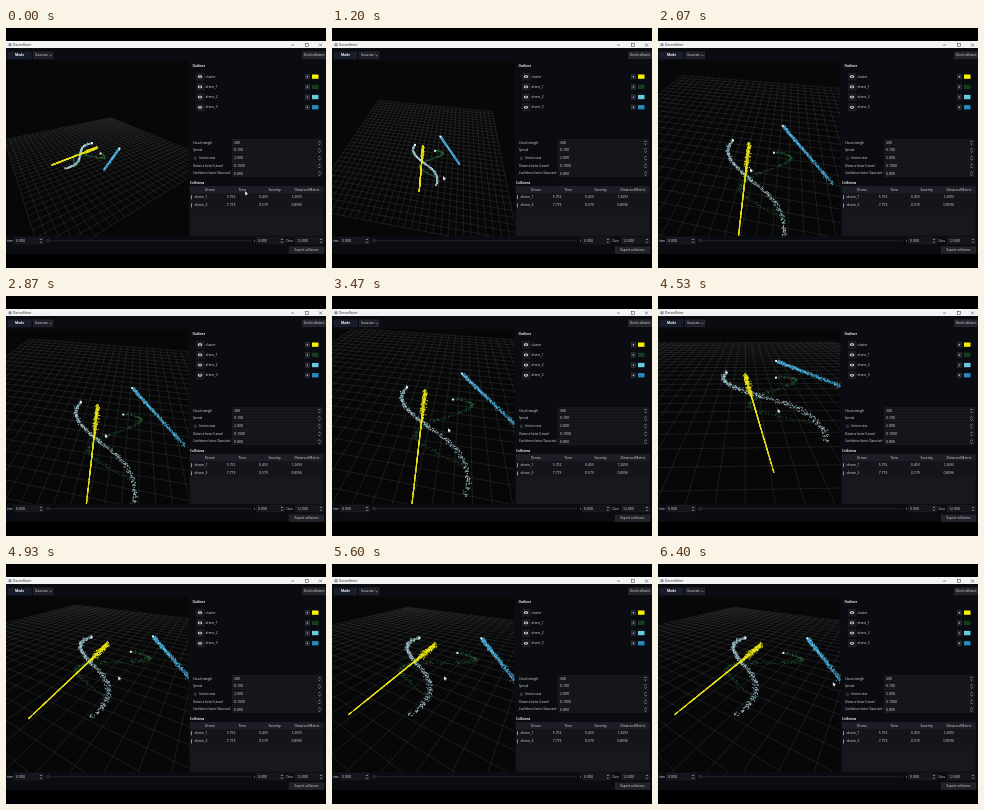
An HTML page with a canvas for the animation above (6470 ms loop, 320x240 px).

```html
<!DOCTYPE html>
<html lang="en">
<head>
<meta charset="utf-8">
<title>Deconflicter</title>
<style>
html, body { margin: 0; width: 100%; height: 100%; overflow: hidden; background: #000; }
canvas { display: block; width: 320px; height: 240px; }
</style>
</head>
<body>
<canvas id="stage" width="320" height="240"></canvas>
<script>
const ctx = document.getElementById('stage').getContext('2d');
const { PI, sin, cos, min, max, floor } = Math;
const LOOP = 6470, STEPS = 97;
const FOCAL = 158, CX = 91, CY = 120;
const GRID_TURN = 12 * PI / 180;
const FONT = '"Open Sans", "Noto Sans", sans-serif';

// Camera moves: each eases from the previous pose; u, v place the origin on screen.
const POSE = { az: 45, el: 28, dist: 21, u: 91, v: 121 };
const MOVES = [
  { at: 700, end: 1200, az: -2, el: 48, v: 119.5 },
  { at: 1400, end: 2070, az: -1, el: 46, dist: 10.5, v: 118 },
  { at: 2600, end: 3350, dist: 9.5, u: 93, v: 98 },
  { at: 3500, end: 4070, az: -32, el: 36, dist: 9, u: 79, v: 83 },
  { at: 4150, end: 4930, az: 20, dist: 9.5, u: 102, v: 83 },
  { at: 4930, end: 5500, az: 22, el: 35, u: 103, v: 84 }
];
const POINTER = { x: 239, y: 163 };
const DRAGS = [
  { at: 120, end: 660, x: 103, y: 147 },
  { at: 700, end: 1200, x: 111, y: 148 },
  { at: 1200, end: 2070, x: 92, y: 140 },
  { at: 2600, end: 3350, x: 116, y: 132 },
  { at: 3500, end: 4070, x: 124, y: 113 },
  { at: 4150, end: 4930, x: 112, y: 112 },
  { at: 5600, end: 6400, x: 176, y: 118 }
];

function follow(first, moves, t) {
  const now = { ...first };
  for (const { at, end, ...goal } of moves) {
    const k = max(0, min(1, (t - at) / (end - at)));
    const e = k * k * (3 - 2 * k);
    for (const key in goal) now[key] += (goal[key] - now[key]) * e;
  }
  return now;
}

let seed = 7;
function rand() {
  seed = (seed * 16807) % 2147483647;
  return seed / 2147483647;
}
const gauss = () => (rand() + rand() + rand() + rand() - 2) * 1.7;

function cloud(at, count, colors, size, spread) {
  const dots = Array.from({ length: count }, () => {
    const u = rand(), s = spread(u);
    return {
      pos: at(u).map(v => v + gauss() * s),
      color: colors[floor(rand() * colors.length)]
    };
  });
  return { at, dots, size };
}

const leader = cloud(u => [6.37 * u, -0.62 * u, 0.2], 650,
  ['#eee81a', '#f8f01c', '#c9c312'], 1, u => 0.07 * max(0, min(1, (0.42 - u) * 6)));
const weave = cloud(u => [5.95 * u - 0.1, 0.05 - 1.35 * cos(PI * (1.4 * u - 0.2)), 0.45 - 0.05 * u], 420,
  ['#e2eef0', '#a9cbd3', '#7fabb7', '#5c8793'], 0.9, () => 0.05);
const bend = cloud(u => [0.9 + 3.9 * u ** 1.4, 1 + 1.5 * cos(PI * (2 * u - 0.39)), 0.3 - 0.1 * u], 330,
  ['#1d4527', '#2b6235', '#173a20', '#3a7a48'], 0.75, () => 0.045);
const straight = cloud(u => [4.75 * u - 1.6, 2.46 + 1.74 * u, 0.4], 420,
  ['#379fcf', '#51b4d8', '#2478a8', '#7cc4dc'], 0.95, () => 0.045);

function camera(t) {
  const { az, el, dist, u, v } = follow(POSE, MOVES, t);
  const a = az * PI / 180, e = el * PI / 180;
  return {
    sa: sin(a), ca: cos(a), se: sin(e), ce: cos(e), dist,
    x: (u - CX) * dist / FOCAL, y: (CY - v) * dist / FOCAL
  };
}

function toView(cam, [x, y, z]) {
  const right = y * cam.ca - x * cam.sa;
  const near = x * cam.ca + y * cam.sa;
  return [
    cam.x + right,
    cam.y + z * cam.ce - near * cam.se,
    cam.dist - near * cam.ce - z * cam.se
  ];
}

const toScreen = ([x, y, d]) => [CX + FOCAL * x / d, CY - FOCAL * y / d];
const NEAR = 0.4;

function segment(cam, p, q) {
  let a = toView(cam, p), b = toView(cam, q);
  if (a[2] < NEAR && b[2] < NEAR) return;
  const cut = (m, n) => m.map((v, i) => v + (n[i] - v) * (NEAR - m[2]) / (n[2] - m[2]));
  if (a[2] < NEAR) a = cut(a, b);
  else if (b[2] < NEAR) b = cut(b, a);
  ctx.moveTo(...toScreen(a));
  ctx.lineTo(...toScreen(b));
}

function drawGrid(cam) {
  const HALF = 10, CELLS = 30;
  const c = cos(GRID_TURN), s = sin(GRID_TURN);
  const spin = (x, y) => [x * c + y * s, y * c - x * s, 0];
  ctx.beginPath();
  for (let i = 0; i <= CELLS; i++) {
    const k = HALF * (2 * i / CELLS - 1);
    segment(cam, spin(k, -HALF), spin(k, HALF));
    segment(cam, spin(-HALF, k), spin(HALF, k));
  }
  ctx.strokeStyle = 'rgba(190,194,200,0.2)';
  ctx.lineWidth = 0.55;
  ctx.stroke();
}

function dot(cam, pos, size) {
  const v = toView(cam, pos);
  if (v[2] < NEAR) return;
  const [x, y] = toScreen(v);
  ctx.fillRect(x - size / 2, y - size / 2, size, size);
}

function drawCloud(cam, path) {
  for (const d of path.dots) {
    ctx.fillStyle = d.color;
    dot(cam, d.pos, path.size);
  }
  if (path === leader) return;
  ctx.fillStyle = '#fff';
  dot(cam, path.at(0), 1.8);
}

function drawScene(t) {
  const cam = camera(t);
  ctx.save();
  ctx.beginPath();
  ctx.rect(0, 33, 182.5, 175);
  ctx.clip();
  ctx.fillStyle = '#070708';
  ctx.fillRect(0, 33, 183, 175);
  drawGrid(cam);
  [bend, straight, weave].forEach(p => drawCloud(cam, p));
  ctx.beginPath();
  segment(cam, leader.at(0), leader.at(1));
  ctx.strokeStyle = '#cfc914';
  ctx.lineWidth = 0.9;
  ctx.stroke();
  drawCloud(cam, leader);
  ctx.restore();
}

function box(x, y, w, h, fill, edge) {
  ctx.fillStyle = fill;
  ctx.fillRect(x, y, w, h);
  if (!edge) return;
  ctx.strokeStyle = edge;
  ctx.lineWidth = 0.4;
  ctx.strokeRect(x + 0.2, y + 0.2, w - 0.4, h - 0.4);
}

function text(str, x, y, { bold, size = 3.5, align = 'left', color = '#dcdde1' } = {}) {
  ctx.font = `${bold ? 'bold ' : ''}${size}px ${FONT}`;
  ctx.textAlign = align;
  ctx.textBaseline = 'middle';
  ctx.fillStyle = color;
  ctx.fillText(str, x, y);
}

function stroke(color, width, ...lines) {
  ctx.beginPath();
  for (const [x1, y1, x2, y2] of lines) {
    ctx.moveTo(x1, y1);
    ctx.lineTo(x2, y2);
  }
  ctx.strokeStyle = color;
  ctx.lineWidth = width;
  ctx.stroke();
}

function disc(x, y, r, fill) {
  ctx.beginPath();
  ctx.arc(x, y, r, 0, 2 * PI);
  ctx.fillStyle = fill;
  ctx.fill();
}

function chevron(x, y, dir) {
  stroke('#d0d1d6', 0.6, [x - 1.1, y, x, y + dir], [x, y + dir, x + 1.1, y]);
}

function field(value, x, y, w) {
  box(x, y - 3.3, w, 6.6, '#15161c', '#24252c');
  text(value, x + 2, y);
  chevron(x + w - 3, y - 0.8, -1.1);
  chevron(x + w - 3, y + 0.8, 1.1);
}

function drawTop() {
  box(0, 13, 320, 7, '#f3f3f5');
  box(2.5, 15.3, 3, 3, '#8a929c');
  text('Deconflicter', 7, 16.8, { color: '#222', size: 3.3 });
  stroke('#333', 0.5, [285, 17, 288, 17], [313, 15.5, 316, 18.5], [313, 18.5, 316, 15.5]);
  ctx.strokeRect(299.5, 15.5, 2.8, 2.8);
  box(1.5, 23.5, 24, 7.6, '#191d2b');
  text('Mode', 13.5, 27.4, { bold: true, size: 3.3, align: 'center', color: '#fff' });
  box(27.5, 23.8, 19.5, 7, '#1c1d24', '#3a3b43');
  text('Gaussian', 29, 27.4, { size: 3.1 });
  chevron(44.5, 26.8, 1.1);
  box(296.5, 23.8, 23, 7, '#22232b', '#3a3b43');
  text('Check collisions', 308, 27.4, { size: 2.8, align: 'center', color: '#eee' });
}

function drawOutliner() {
  text('Outliner', 186.5, 38.2, { bold: true, size: 3, color: '#eee' });
  const rows = { cluster: '#f4f000', drone_1: '#153d20', drone_2: '#68cbdd', drone_3: '#2889bd' };
  Object.entries(rows).forEach(([name, color], i) => {
    const y = 48.7 + i * 10.2;
    box(190, y - 4, 8.5, 8, '#1b1c23');
    ctx.beginPath();
    ctx.ellipse(194, y, 2.2, 1.4, 0, 0, 2 * PI);
    ctx.fillStyle = '#d5d6da';
    ctx.fill();
    disc(194, y, 0.8, '#1b1c23');
    text(name, 199.5, y, { size: 3.2 });
    box(299, y - 2.4, 4.8, 4.8, '#202128', '#45464d');
    disc(301.4, y, 0.7, '#dadbdd');
    box(306, y - 2.2, 6.5, 4.3, color);
  });
}

function drawFields() {
  const rows = {
    'Cloud strength': '300', 'Spread': '0.100', 'Section view': '2.000',
    'Distance factor (Linear)': '0.1000', 'Confidence factor (Gaussian)': '0.800'
  };
  Object.entries(rows).forEach(([label, value], i) => {
    const y = 114.8 + i * 7.7;
    const indent = label === 'Section view' ? 6 : 0;
    if (indent) box(188, y - 1.3, 2.6, 2.6, '#15161c', '#66676d');
    text(label, 187 + indent, y, { size: 2.8 });
    field(value, 226, y, 90.5);
  });
}

function drawTable() {
  text('Collisions', 184, 154.8, { bold: true, size: 3, color: '#eee' });
  box(184, 158, 133.5, 50, '#17181e');
  box(184, 158, 133.5, 7, '#1d1e25');
  const column = i => 204 + i * 32.3;
  ['Drone', 'Time', 'Severity', 'Distance/Metric'].forEach((h, i) =>
    text(h, column(i), 161.7, { align: 'center', size: 3.4 }));
  const rows = ['drone_1 5.752 0.453 1.2693', 'drone_3 7.773 0.579 0.8596'];
  rows.forEach((row, r) => {
    const y = 169.2 + r * 8.2;
    box(184, y - 3.9, 133.5, 7.7, '#14151b');
    box(185, y - 2, 0.7, 4, '#c9cad0');
    row.split(' ').forEach((v, i) => text(v, column(i) - 15.5, y, { size: 3.4 }));
  });
}

function drawBottom() {
  const y = 212.8;
  text('time', 1, y, { size: 2.8 });
  field('0.000', 8, y, 30);
  stroke('#292a31', 0.8, [42, y, 245, y]);
  disc(42, y, 1.8, '#34353d');
  disc(42, y, 0.8, '#090a0f');
  text('t', 248, y, { size: 3 });
  field('0.000', 250, y, 29);
  text('Dura', 280.5, y, { size: 2.8 });
  field('12.000', 289, y, 29);
  box(283, 218.8, 35, 6.6, '#202129', '#33343b');
  text('Export collisions', 300.5, 222, { align: 'center', size: 3.2 });
}

function drawPointer(t) {
  const { x, y } = follow(POINTER, DRAGS, t);
  ctx.beginPath();
  ctx.moveTo(x, y);
  ctx.lineTo(x, y + 4.4);
  ctx.lineTo(x + 1.1, y + 3.5);
  ctx.lineTo(x + 2, y + 5.1);
  ctx.lineTo(x + 2.1, y + 3.1);
  ctx.lineTo(x + 3.3, y + 3.1);
  ctx.closePath();
  ctx.fillStyle = '#fff';
  ctx.fill();
  ctx.strokeStyle = '#222';
  ctx.lineWidth = 0.3;
  ctx.stroke();
}

function draw(t) {
  box(0, 0, 320, 240, '#000');
  box(0, 20, 320, 206, '#0b0c11');
  drawTop();
  drawScene(t);
  drawOutliner();
  drawFields();
  drawTable();
  drawBottom();
  drawPointer(t);
}

const start = performance.now();
function tick() {
  const t = (performance.now() - start) % LOOP;
  const step = LOOP / STEPS;
  draw(floor(t / step) * step);
  requestAnimationFrame(tick);
}
tick();
</script>
</body>
</html>
```
